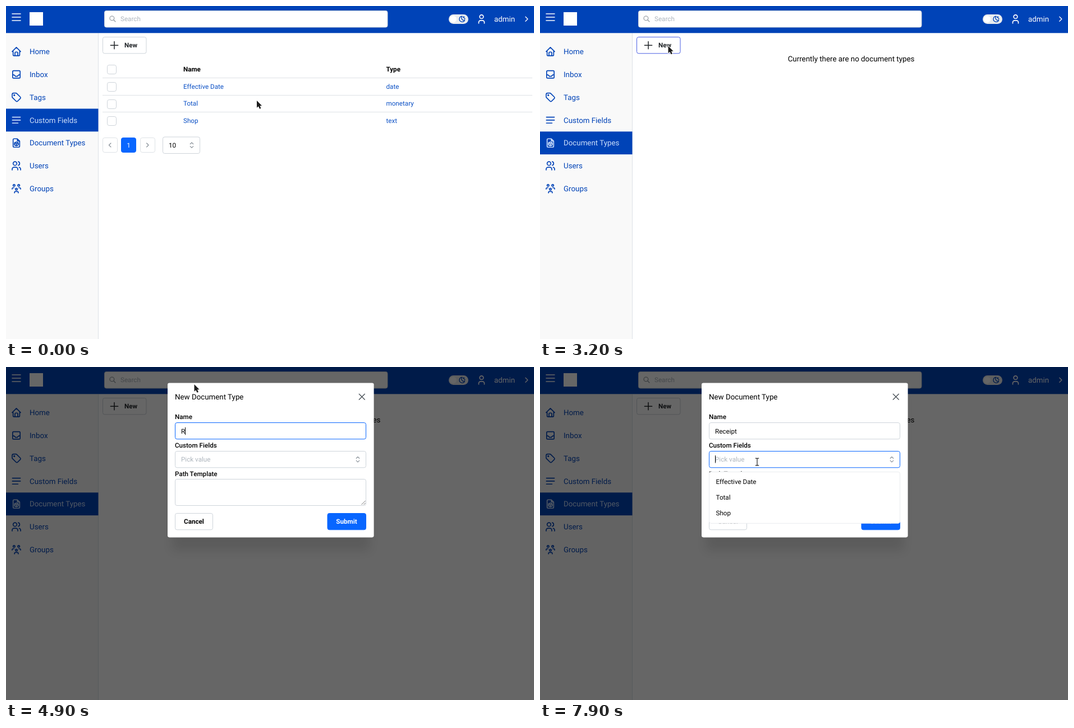
Animation of 941x595 px, one loop 8 s. Source, as an HTML page:

```html
<!DOCTYPE html>
<html lang="en">
<head>
<meta charset="utf-8">
<title>Document types</title>
<style>
  html, body { margin: 0; width: 100%; height: 100%; overflow: hidden; background: #fff; }
  svg { display: block; width: 941px; height: 595px; cursor: default; }
  text { font-family: Roboto, "Liberation Sans", sans-serif; text-rendering: geometricPrecision; white-space: pre; }
</style>
</head>
<body>
<svg id="stage" viewBox="0 0 941 595" xmlns="http://www.w3.org/2000/svg"></svg>
<script>
const LOOP = 8000, STEP = 100;
const NAVY = '#0043b7', BLUE = '#0866ff', LINK = '#0b50c5', PALE = '#cbddfa';
const EDGE = '#ced4da', RULE = '#dee2e6', HINT = '#adb5bd', INK = '#000';
const SMALL = 11.67, BIG = 13.33;

// Icons are drawn on a 24 x 24 grid.
const ICON = {
  menu: 'M3 4.8h18M3 12h18M3 19.2h18',
  home: 'M5 12H3l9-9 9 9h-2M5 12v7a2 2 0 0 0 2 2h10a2 2 0 0 0 2-2v-7M9 21v-6a2 2 0 0 1 2-2h2a2 2 0 0 1 2 2v6',
  inbox: 'M4 6a2 2 0 0 1 2-2h12a2 2 0 0 1 2 2v12a2 2 0 0 1-2 2H6a2 2 0 0 1-2-2zM4 13h3l3 3h4l3-3h3',
  tag: 'M6.5 7.5a1 1 0 1 0 2 0a1 1 0 1 0-2 0M3 6v5.17a2 2 0 0 0 .59 1.42l7.7 7.7a2.41 2.41 0 0 0 3.42 0l5.58-5.58a2.41 2.41 0 0 0 0-3.42l-7.7-7.7A2 2 0 0 0 11.17 3H6a3 3 0 0 0-3 3z',
  lines: 'M3.5 5.6h17M3.5 12h17M3.5 18.4h12',
  file: 'M14 3v4a1 1 0 0 0 1 1h4M17 21H7a2 2 0 0 1-2-2V5a2 2 0 0 1 2-2h7l5 5v11a2 2 0 0 1-2 2zM12 13.5l4-1.5M8 11.85l4 1.65V18l4-1.85v-4.3L12 10zM8 12v4.2l4 1.8',
  users: 'M5 7a4 4 0 1 0 8 0a4 4 0 1 0-8 0M3 21v-2a4 4 0 0 1 4-4h4a4 4 0 0 1 4 4v2M16 3.13a4 4 0 0 1 0 7.75M21 21v-2a4 4 0 0 0-3-3.85',
  group: 'M10 13a2 2 0 1 0 4 0a2 2 0 0 0-4 0M8 21v-1a2 2 0 0 1 2-2h4a2 2 0 0 1 2 2v1M15 5a2 2 0 1 0 4 0a2 2 0 0 0-4 0M17 10h2a2 2 0 0 1 2 2v1M5 5a2 2 0 1 0 4 0a2 2 0 0 0-4 0M3 13v-1a2 2 0 0 1 2-2h2',
  user: 'M8 7a4 4 0 1 0 8 0a4 4 0 0 0-8 0M6 21v-2a4 4 0 0 1 4-4h4a4 4 0 0 1 4 4v2',
  moon: 'M12 3h.4a7.5 7.5 0 0 0 7.9 12.45A9 9 0 1 1 12 3zM17 4a2 2 0 0 0 2 2a2 2 0 0 0-2 2a2 2 0 0 0-2-2a2 2 0 0 0 2-2M19 11h2m-1-1v2',
  search: 'M3 10a7 7 0 1 0 14 0a7 7 0 1 0-14 0M21 21l-6-6',
  picker: 'M7 8.5l5-5 5 5M17 15.5l-5 5-5-5',
  plus: 'M12 4v16M4 12h16',
  left: 'M14.5 6l-6 6 6 6',
  right: 'M9.5 6l6 6-6 6',
  cross: 'M6 6l12 12M18 6L6 18'
};

const box = (x, y, w, h, fill = '#fff', stroke = EDGE, extra = '') =>
  `<rect x="${x}" y="${y}" width="${w}" height="${h}" rx="3.3" fill="${fill}" stroke="${stroke}" ${extra}/>`;
const flat = (x, y, w, h, fill, extra = '') =>
  `<rect x="${x}" y="${y}" width="${w}" height="${h}" fill="${fill}" ${extra}/>`;
const label = (x, y, str, fill = INK, size = SMALL, weight = 400, extra = '') =>
  `<text x="${x}" y="${y}" fill="${fill}" font-size="${size}" font-weight="${weight}" ${extra}>${str}</text>`;
const icon = (cx, cy, size, name, color, width = 2) =>
  `<path d="${ICON[name]}" transform="translate(${cx - size / 2} ${cy - size / 2}) scale(${size / 24})"
    fill="none" stroke="${color}" stroke-width="${width}" stroke-linecap="round" stroke-linejoin="round"/>`;
const group = (id, inner) => `<g id="${id}">${inner}</g>`;
const MIDDLE = 'text-anchor="middle"';

const MENU = [['Home', 'home'], ['Inbox', 'inbox'], ['Tags', 'tag'], ['Custom Fields', 'lines'],
  ['Document Types', 'file'], ['Users', 'users'], ['Groups', 'group']];
const FIELDS = [['Effective Date', 'date'], ['Total', 'monetary'], ['Shop', 'text']];
const ROW = 40.83, ROW_TOP = 61;

function header() {
  return flat(0, 0, 941, 48.3, NAVY) +
    icon(18.5, 20, 20, 'menu', '#fff', 1.9) +
    flat(42, 11, 24, 24, '#fff') +
    box(175.5, 8.5, 504.5, 29.5) + icon(190, 23, 13.3, 'search', '#868e96') +
    label(204, 27.3, 'Search', HINT) +
    `<rect x="789" y="15" width="35" height="17" rx="8.5" fill="#e9ecef"/>` +
    `<circle cx="797" cy="23.5" r="6" fill="#fff"/>` +
    icon(813, 23.3, 13.3, 'moon', NAVY, 2.4) +
    icon(847.5, 23.3, 20, 'user', '#fff') +
    label(870, 27.8, 'admin', '#fff', BIG) +
    icon(927.5, 23.3, 16, 'right', '#fff');
}

function sidebar() {
  const rows = MENU.map(([name, pic], i) => {
    const mid = ROW_TOP + ROW * (i + .5);
    return `<g class="item">${flat(0, ROW_TOP + ROW * i, 164.5, ROW, NAVY)}` +
      `<g class="off">${icon(18.5, mid, 20, pic, NAVY)}${label(42, mid + 4.6, name, NAVY, BIG)}</g>` +
      `<g class="hot">${icon(18.5, mid, 20, pic, BLUE)}${label(42, mid + 4.6, name, BLUE, BIG)}</g>` +
      `<g class="on">${icon(18.5, mid, 20, pic, PALE)}${label(42, mid + 4.6, name, PALE, BIG)}</g></g>`;
  });
  return flat(0, 48.3, 164.5, 547, '#f9f9f9') + flat(164, 48.3, 1, 547, RULE) + rows.join('');
}

function table() {
  const check = y => box(180.5, y, 16, 16);
  const rows = FIELDS.map(([name, type], i) => {
    const y = 147.6 + 30.5 * i;
    return check(Math.floor(y - 11) + .5) + label(316, y, name, LINK) + label(677.5, y, type, LINK) +
      (i < 2 ? flat(172, Math.round(y + 11), 766, 1, RULE) : '');
  });
  return check(105.5) + label(316, 117, 'Name', INK, SMALL, 600) + label(677.5, 117, 'Type', INK, SMALL, 600) +
    flat(172, 128, 766, 1, RULE) + rows.join('') +
    box(172.5, 235.5, 26, 26, '#fff', RULE) + icon(185.5, 248.5, 14, 'left', '#868e96') +
    box(205.5, 235.5, 26, 26, BLUE, BLUE) + label(218.5, 252.7, '1', '#fff', SMALL, 400, MIDDLE) +
    box(239.5, 235.5, 26, 26, '#fff', RULE) + icon(252, 248.5, 14, 'right', '#868e96') +
    box(279.5, 234, 66, 29.5) + label(290, 252.7, '10') + icon(331, 248.7, 13.3, 'picker', '#868e96');
}

function modal() {
  const caret = (id, y) => flat(312, y, 1, 13.5, INK, `id="${id}"`);
  const options = FIELDS.map(([name], i) => label(313.5, 208.6 + 28 * i, name)).join('');
  return `<rect x="296" y="48" width="352" height="280" fill="#000" opacity=".1" style="filter:blur(9px)"/>` +
    `<rect x="288" y="28.4" width="367.6" height="276" rx="3.3" fill="#fff"/>` +
    label(301, 57.6, 'New Document Type', INK, BIG) +
    box(623, 41.3, 23, 24, 'none', INK, 'id="ring" stroke-width="2"') +
    icon(634.3, 53.3, 20, 'cross', '#495057', 1.6) +
    label(301, 92.6, 'Name', INK, SMALL, 500) +
    box(301.5, 99.5, 340, 29.3, '#fff', EDGE, 'id="nameBox"') +
    label(312, 118.5, 'Name', HINT, SMALL, 400, 'id="nameHint"') +
    label(312, 118.5, '', INK, SMALL, 400, 'id="typed"') + caret('nameCaret', 107.8) +
    label(301, 143.6, 'Custom Fields', INK, SMALL, 500) +
    box(301.5, 150.5, 340, 29.3, '#fff', EDGE, 'id="pickBox"') +
    label(312, 168.8, 'Pick value', HINT) + icon(627, 165.2, 13.3, 'picker', '#868e96') +
    caret('pickCaret', 158) +
    label(301, 194.5, 'Path Template', INK, SMALL, 500) +
    box(301.5, 200.5, 340, 47) +
    `<path d="M633.5 246l7-7M637.5 246l3-3" stroke="#777" fill="none"/>` +
    box(301.5, 261.5, 67, 29.3) + label(335, 280.4, 'Cancel', INK, SMALL, 600, MIDDLE) +
    box(573, 261.5, 68.5, 29.3, BLUE, BLUE) + label(607, 280.4, 'Submit', '#fff', SMALL, 600, MIDDLE) +
    group('menu', box(301.5, 187.5, 340, 91.8, '#fff', '#e9ecef') + options);
}

function pointer() {
  const shape = (id, d) => `<path id="${id}" d="${d}" fill="#1c1c1c" stroke="#fff" stroke-width="1.8" stroke-linejoin="round" paint-order="stroke"/>`;
  return shape('arrow', 'M0 0V12.8L2.9 10.2L5 14.8L7.4 13.8L5.4 9.3H9.1Z') +
    shape('hand', 'M-1.4 1A1.3 1.3 0 0 1 1.2 1V5L7 6.2Q8.2 6.6 8 8.2L7 12V14.5H-.5V12.4L-3.6 8.2Q-4 6.4-2.6 6.6L-1.4 7.6Z') +
    `<g id="beam" fill="none"><path d="M0-5.5V5.5" stroke="#fff" stroke-width="3"/>
      <path d="M-3.2-6.3H-1Q0-6.3 0-5.2V5.2Q0 6.3-1 6.3H-3.2M3.2-6.3H1Q0-6.3 0-5.2M0 5.2Q0 6.3 1 6.3H3.2" stroke="#222" stroke-width="1.2"/></g>`;
}

const stage = document.getElementById('stage');
stage.innerHTML = flat(0, 0, 941, 595, '#fff') + sidebar() + header() +
  box(172.5, 55.5, 77.5, 29.3, '#fff', EDGE, 'id="newBox"') +
  icon(193, 70.2, 20, 'plus', '#212529', 1.8) + label(211, 74.3, 'New', '#212529', SMALL, 600) +
  group('table', table()) +
  group('empty', label(441.7, 99.4, 'Currently there are no document types', INK, BIG)) +
  group('status', box(-4, 577.5, 110, 22, '#f0f0f4', '#cfcfd8') + label(5, 590, '/document-types', '#333', 10)) +
  flat(0, 0, 941, 595, '#000', 'id="shade"') +
  group('modal', modal()) + group('pointer', pointer());

const $ = id => document.getElementById(id);
const show = (el, on) => { el.style.display = on ? '' : 'none'; };
const clamp = v => Math.min(1, Math.max(0, v));
const items = [...document.querySelectorAll('.item')];

// Pointer path: time, x, y, easing of the way there.
const EASE = { line: u => u, both: u => u * u * (3 - 2 * u), out: u => u * (2 - u) };
const PATH = [
  [200, 447, 169], [1150, 122, 248.6, 'both'], [1800, 121.5, 248], [2700, 227, 70.5, 'both'],
  [3000, 227, 70.5], [3200, 228.5, 71.5], [3300, 239, 81], [3400, 260, 101], [3800, 337, 115, 'out'],
  [4000, 337, 115], [4200, 335.5, 31], [6700, 335.5, 31], [7200, 387, 163, 'both'],
  [7800, 387, 163], [7900, 387, 169.5]
];
function pointerAt(t) {
  const i = PATH.findIndex(p => p[0] > t);
  if (i === 0) return PATH[0].slice(1, 3);
  if (i < 0) return PATH[PATH.length - 1].slice(1, 3);
  const [t0, x0, y0] = PATH[i - 1], [t1, x1, y1, ease = 'line'] = PATH[i];
  const u = EASE[ease]((t - t0) / (t1 - t0));
  return [x0 + (x1 - x0) * u, y0 + (y1 - y0) * u];
}

// Typing: time and number of letters.
const WORD = 'Receipt';
const KEYS = [[4900, 1], [5200, 2], [5400, 4], [5600, 5], [5800, 6], [5900, 7]];
const within = (t, a, b) => t >= a && t < b;

function render(time) {
  const t = Math.floor(time / STEP) * STEP;
  const [x, y] = pointerAt(t);
  const open = t >= 3300;

  const active = t < 1600 ? 3 : 4;
  const over = !open && x < 165 ? Math.floor((y - ROW_TOP) / ROW) : -1;
  items.forEach((el, i) => {
    const [bg, off, hot, on] = el.children;
    show(bg, i === active);
    show(on, i === active);
    show(hot, i === over && i !== active);
    show(off, i !== over && i !== active);
  });
  show($('table'), active === 3);
  show($('empty'), active === 4);
  show($('status'), within(t, 1400, 2300));
  const onNew = !open && x > 172 && x < 250 && y > 55 && y < 85;
  $('newBox').setAttribute('stroke', onNew ? '#4a5fe3' : EDGE);

  const p = clamp((t - 3220) / 100);
  $('shade').setAttribute('opacity', .6 * p);
  $('modal').setAttribute('opacity', p);
  $('modal').setAttribute('transform', `translate(0 ${-25 * (1 - p)})`);
  show($('modal'), p > 0);
  show($('ring'), t < 3900);

  const letters = KEYS.reduce((n, [at, count]) => t >= at ? count : n, 0);
  $('typed').textContent = WORD.slice(0, letters);
  show($('nameHint'), letters === 0);
  $('nameBox').setAttribute('stroke', within(t, 4000, 7500) ? BLUE : EDGE);
  $('nameCaret').setAttribute('x', 312 + (letters ? Math.round($('typed').getComputedTextLength()) : 0));
  show($('nameCaret'), within(t, 4000, 4500) || within(t, 4900, 6500) || within(t, 7000, 7500));

  $('pickBox').setAttribute('stroke', t >= 7500 ? BLUE : EDGE);
  show($('pickCaret'), t >= 7500);
  $('menu').setAttribute('opacity', clamp((t - 7450) / 100));

  const inField = open && x > 301 && x < 642 && (within(y, 99, 129) || within(y, 150, 180));
  show($('beam'), inField);
  show($('hand'), over >= 0);
  show($('arrow'), !inField && over < 0);
  $('pointer').setAttribute('transform', `translate(${x.toFixed(1)} ${y.toFixed(1)})`);
}

const start = performance.now();
function tick() {
  render((performance.now() - start) % LOOP);
  requestAnimationFrame(tick);
}
tick();
</script>
</body>
</html>
```
